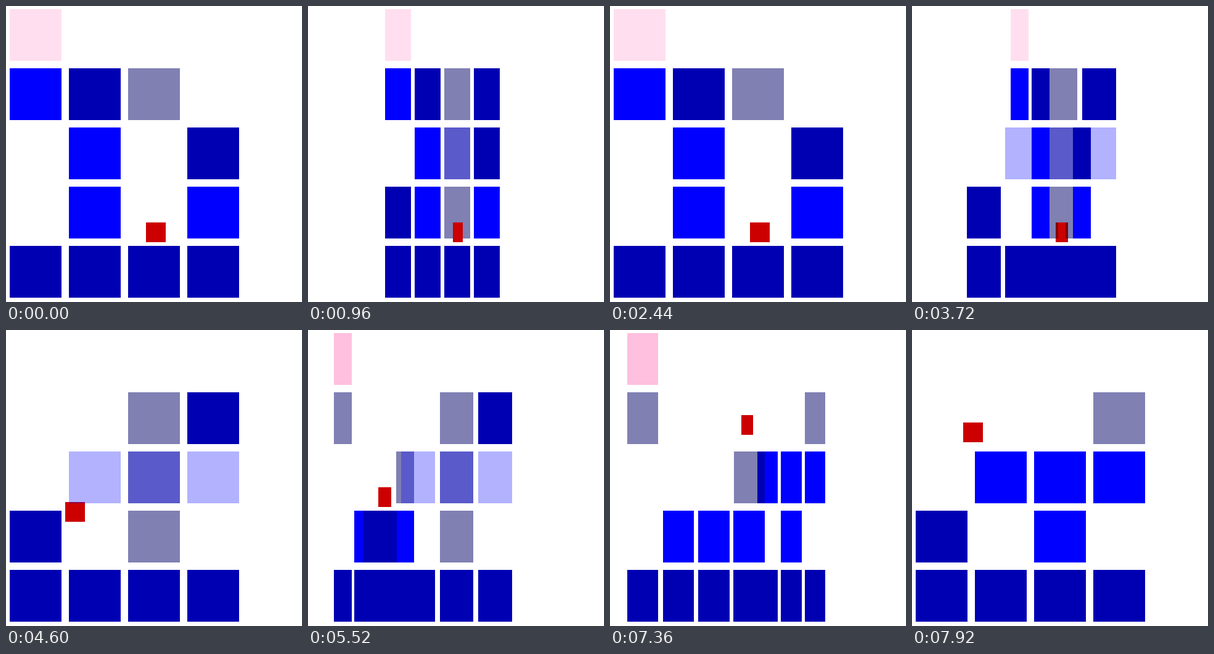
Recreate the animation shown at these times as an HTML page with a canvas. Size 480 px wide and 480 px high, loop 8000 ms.

```html
<!DOCTYPE html>
<html lang="en">
<head>
<meta charset="utf-8">
<title>Turning block world</title>
<style>
  html, body { margin: 0; width: 100%; height: 100%; overflow: hidden; background: #fff; }
  canvas { display: block; }
</style>
</head>
<body>
<canvas id="stage" width="480" height="480"></canvas>
<script>
const ctx = document.getElementById('stage').getContext('2d');
const LOOP = 8000, PITCH = 96, BLOCK = 84, PLAYER = 32, TICK = 100 / 3;
const RED = '#c00', SHADE = 'rgb(128,128,179)', LIGHT = 'rgba(0,0,255,.3)';
const SOLID = { p: '#ffdfef', P: '#ffbfdf', b: '#00f', d: 'rgb(0,0,179)' };

// p/P goal, b blue, d dark, l light, s shade in front of the player, S shade and light.
// Each view runs along world axis x or z.
const VIEWS = {
  A: { axis: 'x', rows: ['p...', 'bds.', '.b.d', '.b.b', 'dddd'] },
  B: { axis: 'z', rows: ['....', '..sd', '.lSl', 'd.s.', 'dddd'] },
  C: { axis: 'x', rows: ['P...', 's...', '...s', '.bbb', 'dddd'] },
  D: { axis: 'z', rows: ['....', '...s', '.bbb', 'd.b.', 'dddd'] }
};
const TURNS = [[605, 'A', 'B'], [1765, 'B', 'A'], [3285, 'A', 'B'], [5285, 'B', 'C'], [7080, 'C', 'D']];
const WALK = {
  x: [[5960, 243], [6160, 291], [6320, 330]],
  z: [[3954, 243], [4120, 195], [4460, 112], [4700, 112], [4912, 61], [7760, 61], [7920, 99]]
};
const PAUSES = [[5040, 5160], [5160, 5400], [5520, 5640]];

const clamp = (v, lo, hi) => Math.min(hi, Math.max(lo, v));

// The picture advances in 80 ms steps, with a few longer holds
function stepTime(t) {
  for (const [start, end] of PAUSES) if (t >= start && t < end) return start;
  const offset = t >= 1800 && t < 5520 ? 40 : 0;
  return Math.floor((t - offset) / 80) * 80 + offset;
}

function along(keys, t) {
  if (t <= keys[0][0]) return keys[0][1];
  for (let i = 1; i < keys.length; i++) {
    const [t0, v0] = keys[i - 1], [t1, v1] = keys[i];
    if (t < t1) return v0 + (v1 - v0) * (t - t0) / (t1 - t0);
  }
  return keys[keys.length - 1][1];
}

const jump = e => 0.469 * e - 0.00047 * e * e;

function playerTop(t) {
  if (t < 4410) return 351;
  if (t < 6529) {
    const y = 351 - jump(t - 4410);
    return t > 4909 ? Math.min(255, y) : y;
  }
  // Flight is suspended at its peak while the world turns
  return 255 - jump(t - 6529 - clamp(t - 7028, 0, 732));
}

function drawView(view, scale, player) {
  const pivot = player[view.axis === 'x' ? 'z' : 'x'];
  const place = x => Math.round(x * scale + pivot * (1 - scale));
  const fill = (color, x, y, size, blend = 'source-over') => {
    ctx.globalCompositeOperation = blend;
    ctx.fillStyle = color;
    ctx.fillRect(place(x), y, place(x + size) - place(x), size);
  };
  const eachBlock = action => view.rows.forEach((row, r) =>
    [...row].forEach((kind, c) => action(kind, 6 + c * PITCH, 5 + r * PITCH)));

  eachBlock((kind, x, y) => { if (SOLID[kind]) fill(SOLID[kind], x, y, BLOCK); });
  fill(RED, player[view.axis] - PLAYER / 2, Math.round(player.y), PLAYER);
  eachBlock((kind, x, y) => {
    // Overlapping shades must not add up, so they darken to a fixed tone
    if ('sS'.includes(kind)) fill(SHADE, x, y, BLOCK, 'darken');
    if ('lS'.includes(kind)) fill(LIGHT, x, y, BLOCK);
  });
  ctx.globalCompositeOperation = 'source-over';
}

function draw(now) {
  const t = stepTime(now % LOOP);
  const player = { x: along(WALK.x, t), z: along(WALK.z, t), y: playerTop(t) };
  let from = 'A', to = 'A', turn = 1;
  for (const [start, a, b] of TURNS) {
    if (t < start) break;
    [from, to] = [a, b];
    turn = Math.min(1, Math.floor((t - start) / TICK) * 0.05);
  }
  ctx.fillStyle = '#fff';
  ctx.fillRect(0, 0, 480, 480);
  if (turn > 0) drawView(VIEWS[to], turn, player);
  if (turn < 1) drawView(VIEWS[from], 1 - turn, player);
}

const began = performance.now();
function frame() {
  draw(performance.now() - began);
  requestAnimationFrame(frame);
}
frame();
</script>
</body>
</html>
```
